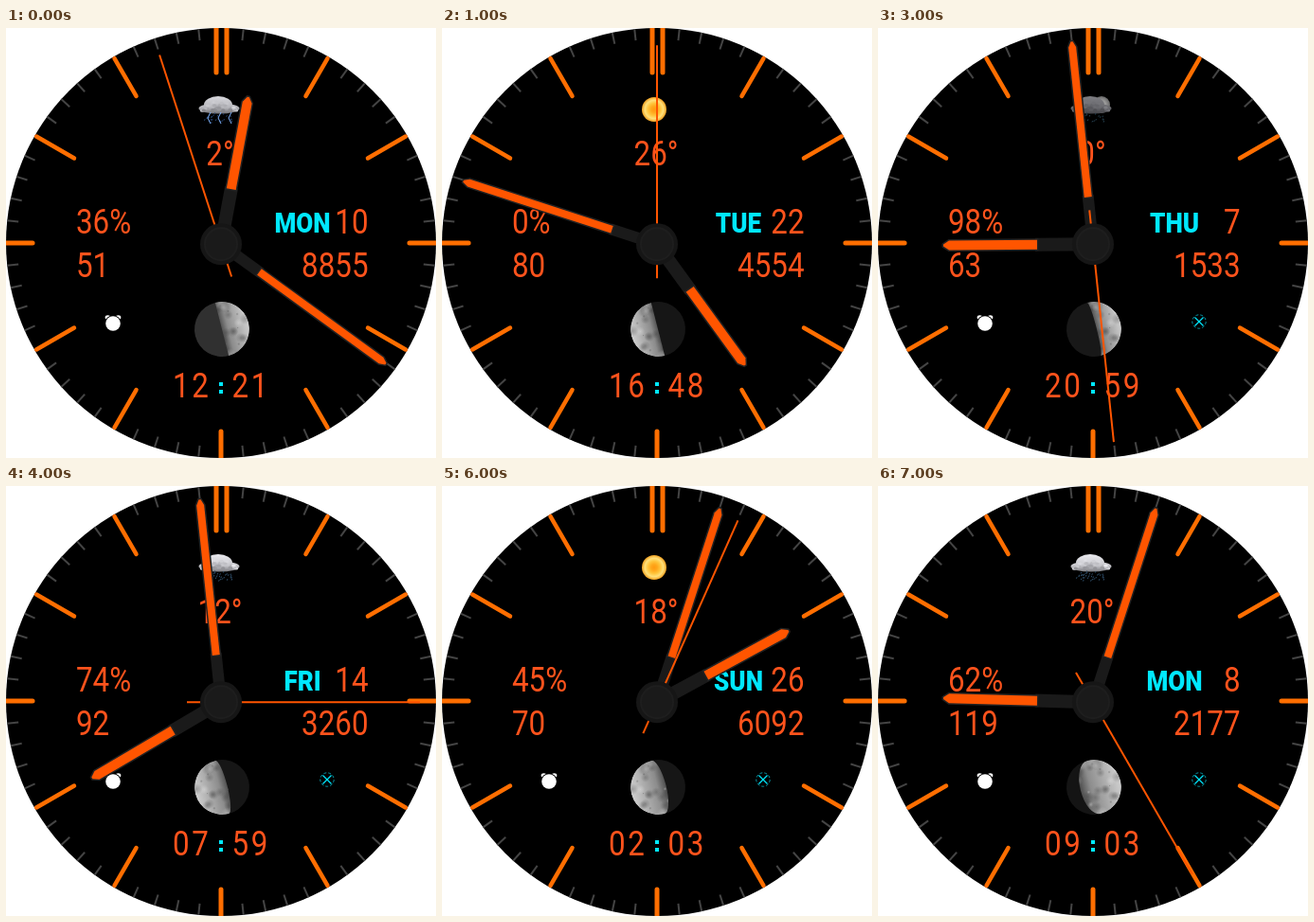
An HTML page with a canvas for the animation above (8 s loop, 454x454 px).

```html
<!DOCTYPE html>
<html lang="en">
<head>
<meta charset="utf-8">
<title>Watch face</title>
<style>
html, body { margin: 0; height: 100%; overflow: hidden; background: #fff; }
canvas { display: block; }
</style>
</head>
<body>
<canvas id="face" width="454" height="454"></canvas>
<script>
const ctx = document.getElementById('face').getContext('2d');
const TAU = Math.PI * 2, CENTER = 227, PIVOT_Y = 228.2;
const ORANGE = '#ff5500', TICK = '#ff6e00', TEXT = '#ff531c', CYAN = '#00e8ff', DARK = '#1a1a1a';

// moon: [lit side (-1 left, 1 right), terminator bulge, shade of the dark part]
const scenes = [
  { time: '12:21', sec: 57, day: 'MON', date: 10, battery: 36, pulse: 51, steps: 8855, temp: '2°', sky: 'storm', moon: [1, 0, '#303030'], alarm: 1 },
  { time: '16:48', sec: 0, day: 'TUE', date: 22, battery: 0, pulse: 80, steps: 4554, temp: '26°', sky: 'sun', moon: [-1, 0, '#161616'] },
  { time: '10:36', sec: 37, day: 'WED', date: 23, battery: 33, pulse: 103, steps: 1946, temp: '--', sky: 'snow', moon: [-1, .35, '#040404'] },
  { time: '20:59', sec: 29, day: 'THU', date: 7, battery: 98, pulse: 63, steps: 1533, temp: '0°', sky: 'night', moon: [1, -.1, '#181818'], alarm: 1, offline: 1 },
  { time: '07:59', sec: 15, day: 'FRI', date: 14, battery: 74, pulse: 92, steps: 3260, temp: '12°', sky: 'rain', moon: [-1, .2, '#161616'], alarm: 1, offline: 1 },
  { time: '03:20', sec: 9, day: 'SAT', date: 18, battery: 16, pulse: 45, steps: 8813, temp: '-5°', sky: 'haze', moon: [-1, .75, '#202020'], alarm: 1, offline: 1 },
  { time: '02:03', sec: 4, day: 'SUN', date: 26, battery: 45, pulse: 70, steps: 6092, temp: '18°', sky: 'sun', moon: [-1, .3, '#161616'], alarm: 1, offline: 1 },
  { time: '09:03', sec: 25, day: 'MON', date: 8, battery: 62, pulse: 119, steps: 2177, temp: '20°', sky: 'rain', moon: [1, .5, '#141414'], alarm: 1, offline: 1 },
];

function at(x, y, angle, paint) {
  ctx.save();
  ctx.translate(x, y);
  ctx.rotate(angle);
  paint();
  ctx.restore();
}

function seeded(seed) {
  return () => (seed = seed * 16807 % 2147483647) / 2147483647;
}

function ellipse(x, y, rx, ry, fill) {
  ctx.fillStyle = fill;
  ctx.beginPath();
  ctx.ellipse(x, y, rx, ry, 0, 0, TAU);
  ctx.fill();
}

function line(x1, y1, x2, y2, color, width, cap = 'butt') {
  ctx.strokeStyle = color;
  ctx.lineWidth = width;
  ctx.lineCap = cap;
  ctx.beginPath();
  ctx.moveTo(x1, y1);
  ctx.lineTo(x2, y2);
  ctx.stroke();
}

// All lettering is a condensed cut of the same face.
function label(str, x, y, align = 'left', font = '400 36px', color = TEXT, spacing = 0) {
  at(x, y, 0, () => {
    ctx.scale(.87, 1);
    ctx.font = font + ' Roboto, sans-serif';
    ctx.letterSpacing = spacing + 'px';
    ctx.textAlign = align;
    ctx.fillStyle = color;
    ctx.fillText(str, 0, 0);
  });
}

function drawTicks() {
  for (let i = 0; i < 60; i++) at(CENTER, CENTER, i * TAU / 60, () => {
    if (i === 0) [-5, 6].forEach(x => line(x, -227, x, -180, TICK, 5, 'round'));
    else if (i % 15 === 0) line(0, -227, 0, -199, TICK, 5, 'round');
    else if (i % 5 === 0) line(0, -225, 0, -179, TICK, 4.5, 'round');
    else line(0, -227, 0, -215, '#444', 2);
  });
}

function drawCloud(bright) {
  const rnd = seeded(11);
  const tone = v => `rgb(${v},${v},${v + 5})`;
  const shade = ctx.createLinearGradient(0, 72, 0, 92);
  shade.addColorStop(0, tone(bright));
  shade.addColorStop(.6, tone(bright * .85 | 0));
  shade.addColorStop(1, tone(bright * .45 | 0));
  ellipse(225, 85, 21.5, 5.5, shade);
  ellipse(224, 81, 15, 9, shade);
  for (let i = 0; i < 40; i++) {
    const x = rnd() * 2 - 1, lift = rnd();
    const y = 87 - lift * 11 * (1 - x * x);
    ellipse(225 + x * 18, y, 2.2, 1.5, tone(bright * (.62 + .38 * lift) | 0));
  }
}

function drawDrops(color, count) {
  const rnd = seeded(5);
  for (let i = 0; i < count; i++) {
    const x = 210 + rnd() * 30, y = 89 + rnd() * 11;
    line(x, y, x - .5, y + 1.5, color, 1);
  }
}

function glow(x, y, r, stops) {
  const g = ctx.createRadialGradient(x, y, 0, x, y, r);
  stops.forEach((c, i) => g.addColorStop(i / (stops.length - 1), c));
  ellipse(x, y, r, r, g);
}

const skies = {
  sun() { glow(224, 86, 13, ['#ff9a10', '#ffa81c', '#ffc43a', '#ffe07a', '#f0a020']); },
  snow() { drawCloud(240); drawDrops('#777', 34); },
  rain() { drawCloud(235); drawDrops('#30516e', 36); },
  storm() {
    drawCloud(215);
    drawDrops('#284878', 24);
    for (const x of [214, 225, 236]) {
      line(x + 2, 89, x - 1, 95, '#83b5ff', 1);
      line(x - 1, 95, x + 2, 101, '#83b5ff', 1);
    }
  },
  night() {
    glow(236, 81, 9, ['#aaa', '#999', '#666']);
    drawCloud(125);
    drawDrops('#264050', 26);
  },
  haze() {
    glow(225, 85, 16, ['#777', '#444', '#000']);
    glow(220, 82, 8, ['#fff', '#eee', '#777']);
    for (let y = 84; y < 98; y += 3) line(211, y, 240, y, '#555', .8);
  },
};

function drawMoon([side, bulge, shade]) {
  const R = 29;
  at(228, 318, -.25, () => {
    ellipse(0, 0, R, R, shade);
    ctx.scale(side, 1);
    ctx.beginPath();
    ctx.arc(0, 0, R, -TAU / 4, TAU / 4);
    ctx.ellipse(0, 0, Math.abs(bulge) * R, R, 0, TAU / 4, -TAU / 4, bulge < 0);
    ctx.clip();
    const g = ctx.createLinearGradient(-R * bulge - 3, 0, R, 0);
    g.addColorStop(0, '#3c3c3c');
    g.addColorStop(.3, '#8c8c8c');
    g.addColorStop(1, '#d0d0d0');
    ellipse(0, 0, R, R, g);
    const rnd = seeded(77);
    for (let i = 0; i < 40; i++) {
      const r = 1 + rnd() * 6;
      const x = (rnd() * 2 - 1) * R, y = (rnd() * 2 - 1) * R;
      glow(x, y, r, i % 3 ? ['rgba(40,40,40,.28)', 'rgba(40,40,40,0)'] : ['rgba(240,240,240,.35)', 'rgba(240,240,240,0)']);
    }
  });
}

function drawAlarm() {
  ellipse(107.5, 305.5, 2.8, 2.3, '#fff');
  ellipse(118.5, 305.5, 2.8, 2.3, '#fff');
  ellipse(113, 312, 8.8, 8.8, '#000');
  ellipse(113, 312, 7.8, 7.8, '#fff');
}

function drawOffline() {
  ctx.setLineDash([3, 2]);
  ctx.strokeStyle = '#0899a8';
  ctx.lineWidth = 1;
  ctx.beginPath();
  ctx.arc(339, 310, 7.2, 0, TAU);
  ctx.stroke();
  ctx.setLineDash([]);
  line(334.5, 305.5, 343.5, 314.5, CYAN, 1.2);
  line(343.5, 305.5, 334.5, 314.5, CYAN, 1.2);
}

function drawHand(turn, start, length, half) {
  at(CENTER, PIVOT_Y, turn * TAU, () => {
    ctx.fillStyle = DARK;
    ctx.fillRect(-half - 2, -start - 2, half * 2 + 4, start);
    ctx.beginPath();
    ctx.moveTo(-half, -start);
    ctx.lineTo(-half, 6 - length);
    ctx.lineTo(-1, -length);
    ctx.lineTo(1, -length);
    ctx.lineTo(half, 6 - length);
    ctx.lineTo(half, -start);
    ctx.closePath();
    ctx.strokeStyle = '#222';
    ctx.lineWidth = 3;
    ctx.stroke();
    ctx.fillStyle = ORANGE;
    ctx.fill();
  });
}

function draw(s) {
  ctx.fillStyle = '#fff';
  ctx.fillRect(0, 0, 454, 454);
  ellipse(CENTER, CENTER, 227, 227, '#000');
  drawTicks();

  skies[s.sky]();
  drawMoon(s.moon);
  if (s.alarm) drawAlarm();
  if (s.offline) drawOffline();

  const [hh, mm] = s.time.split(':');
  label(s.temp, 226, 144.7, 'center');
  label(s.battery + '%', 74, 216.8);
  label(s.pulse, 74, 263);
  label(s.day, 313, 216, 'center', '900 30px', CYAN);
  label(s.date, 382.5, 216.8, 'right');
  label(s.steps, 382.5, 263, 'right');
  label(hh, 176, 389.5, 'left', '400 36px', TEXT, 3);
  label(mm, 238.5, 389.5, 'left', '400 36px', TEXT, 3);
  ctx.fillStyle = CYAN;
  ctx.fillRect(225, 374, 4, 4);
  ctx.fillRect(225, 382, 4, 4);

  drawHand((+hh + mm / 60) / 12, 59, 158, 5);
  drawHand(mm / 60, 50, 215, 4);
  at(CENTER, PIVOT_Y, s.sec * TAU / 60, () => line(0, 36, 0, -210, ORANGE, 2));
  ellipse(CENTER, PIVOT_Y, 22, 22, '#161616');
  ellipse(CENTER, PIVOT_Y, 18, 18, '#1e1e1e');
  ellipse(CENTER, PIVOT_Y, 16, 16, DARK);
}

function tick() {
  draw(scenes[Math.floor(performance.now() / 1000) % scenes.length]);
  requestAnimationFrame(tick);
}
tick();
</script>
</body>
</html>
```
